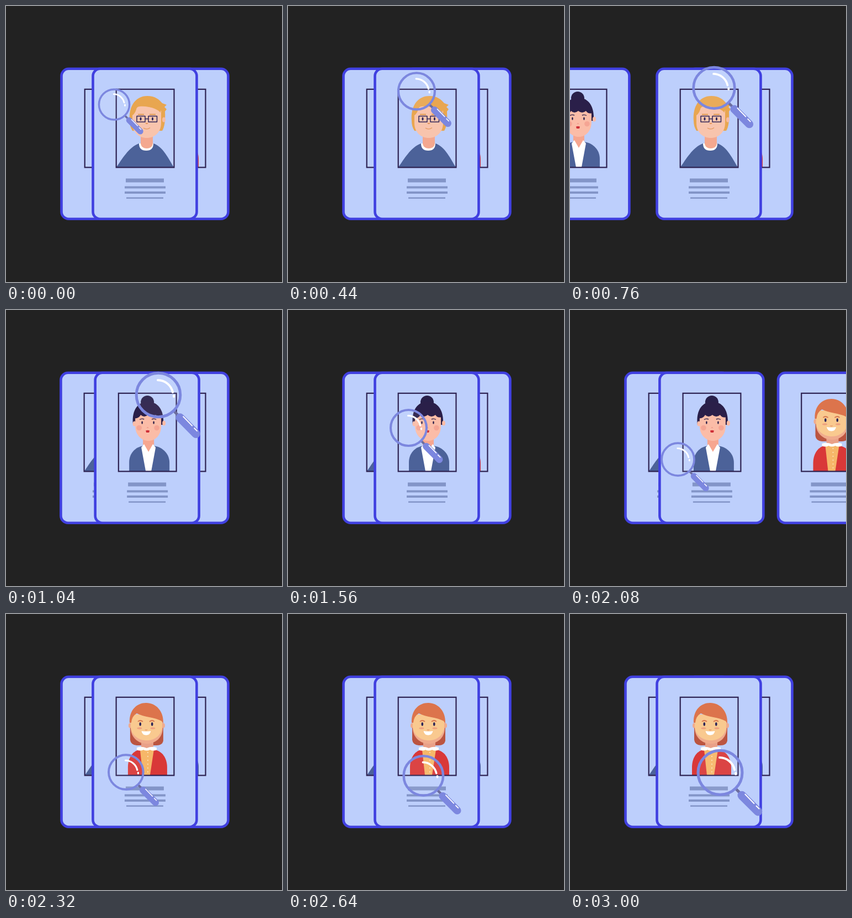
These frames come from a looping animation (500 px wide and 500 px high, 3.04 s). An HTML page:

```html
<!DOCTYPE html>
<html lang="en">
<head>
<meta charset="utf-8">
<title>Profile search</title>
<style>
html, body { margin: 0; width: 100%; height: 100%; overflow: hidden; background: #222; }
svg { display: block; width: 100%; height: 100%; }
</style>
</head>
<body>
<svg viewBox="0 0 500 500">
  <defs>
    <g id="sheet">
      <rect x="157.5" y="113.8" width="188" height="272" rx="13" fill="#bdcffc" stroke="#4040e0" stroke-width="4.6"/>
      <g fill="#8395c8">
        <rect x="217" y="312.5" width="69" height="7"/>
        <rect x="215" y="326.5" width="74" height="4"/>
        <rect x="215" y="336" width="74" height="4"/>
        <rect x="218" y="346.5" width="67" height="2.6"/>
      </g>
    </g>
    <rect id="frame" x="199.7" y="150.8" width="104.8" height="141.6" fill="none" stroke="#2c2150" stroke-width="2.2"/>
  </defs>

  <g id="cards">
    <g id="bun">
      <use href="#sheet"/>
      <path d="M219 292V276C219 260 230 248 245 246H264C281 249 292 261 292 277V292Z" fill="#4c6299"/>
      <path d="M244 228H264V244L254 260 244 244Z" fill="#f6a690"/>
      <path d="M241 249 246 243 254 257 262 243 267 249 259 292H249Z" fill="#fff"/>
      <circle cx="252" cy="167" r="12" fill="#28204a"/>
      <path d="M226 208C223 180 236 166 253 166S283 180 281 208H276V188H231V208Z" fill="#2a1f49"/>
      <g fill="#fbbca7">
        <ellipse cx="228.500" cy="206" rx="3" ry="4.500"/>
        <ellipse cx="282" cy="205" rx="3" ry="4.500"/>
        <path d="M230 186H277V210C277 227 266 237 254 237S230 227 230 210Z"/>
      </g>
      <path d="M229 196V184Q253 162 278 184V194Q271 196 267 190Q260 196 253 190Q246 196 240 190Q236 197 229 196Z" fill="#2a1f49"/>
      <g fill="#f5a594"><circle cx="237" cy="213.500" r="4.800"/><circle cx="269" cy="213.500" r="4.800"/></g>
      <g fill="#2a1f49"><ellipse cx="242.500" cy="204" rx="1.300" ry="2.800"/><ellipse cx="263.500" cy="204" rx="1.300" ry="2.800"/></g>
      <path d="M238 198.500Q242 196 246 198M260 198Q264 196 268 198.500" fill="none" stroke="#2a1f49" stroke-width="1.400"/>
      <path d="M251 213H254" stroke="#ee9585" stroke-width="1.300"/>
      <path d="M249 218.500Q252.500 217 256 218.500L255 222H250Z" fill="#cf3038"/>
      <use href="#frame"/>
    </g>

    <g id="red">
      <use href="#sheet"/>
      <path d="M225 202H285V230Q283 238 273 238H237Q226 237 225 228Z" fill="#bb5541"/>
      <path d="M221 292V278C221 261 229 249 241 246H269C283 248 292 261 292 278V292Z" fill="#d93838"/>
      <path d="M243 246H268L261 292H248Z" fill="#f6b769"/>
      <path d="M257 250V288" stroke="#fbe0b4" stroke-width="1.800" stroke-dasharray="2 5"/>
      <path d="M245 226H267V244Q256 248 245 244Z" fill="#e9a189"/>
      <path d="M237 242Q246 239 255 243Q264 239 273 242V246Q267 249 261 246Q255 249 249 246Q243 249 237 246Z" fill="#fff"/>
      <g fill="#f0ab8d">
        <ellipse cx="225" cy="202" rx="3" ry="4.500"/>
        <ellipse cx="285" cy="202" rx="3" ry="4.500"/>
        <path d="M226 190H284V206C284 225 270 235 255 235S226 224 226 206Z"/>
      </g>
      <path d="M226 182H283V203C283 219 270 229 255 229S226 219 226 203Z" fill="#f9c98f"/>
      <path d="M224 197C223 174 237 161 254 161S286 175 285 198L282 194C270 187 250 187 237 180Q228 185 227 197Z" fill="#dc744c"/>
      <path d="M239 195Q243 191 248 195M260 195Q265 191 269 195" fill="none" stroke="#d67650" stroke-width="1.700"/>
      <g fill="#2a2458"><ellipse cx="243.300" cy="199.500" rx="1.800" ry="3.200"/><ellipse cx="264.800" cy="199.500" rx="1.800" ry="3.200"/></g>
      <g fill="#efa17f"><ellipse cx="242" cy="207" rx="4.500" ry="1.700"/><ellipse cx="266" cy="207" rx="4.500" ry="1.700"/></g>
      <path d="M252 209.500Q254 211 256 209.500" fill="none" stroke="#e58e68" stroke-width="1.200"/>
      <path d="M245.500 212Q254 213.500 262.500 212Q261 219.500 254 219.500T245.500 212Z" fill="#fff"/>
      <use href="#frame"/>
    </g>

    <g id="man">
      <use href="#sheet"/>
      <path d="M200 292C210 278 222 256 241 249H267C285 255 295 278 304 292Z" fill="#4c6299"/>
      <path d="M241 249H267Q267 262 254 262T241 249Z" fill="#fff"/>
      <path d="M244 228H266V250Q264 258 255 258T244 250Z" fill="#f4a88f"/>
      <path d="M224 208C222 182 234 163 256 163C270 163 277 169 283 176L291 179 287 183 291 187 288 191C289 208 287 220 283 226H229Q224 218 224 208Z" fill="#e8a650"/>
      <ellipse cx="286" cy="206" rx="3" ry="4.500" fill="#f6bca4"/>
      <path d="M229 198Q235 194 237 183Q260 178 281 190V212C281 229 269 239 255 239S229 229 229 212Z" fill="#f8c4ad"/>
      <path d="M229 196V186Q252 170 280 184V193Q270 182 241 181Q235 185 229 196Z" fill="#e8a650"/>
      <path d="M239 196.500H250M260 196.500H271" stroke="#dd9850" stroke-width="2.200"/>
      <g fill="#2a2458"><ellipse cx="244" cy="204.500" rx="1.500" ry="3"/><ellipse cx="265.500" cy="204.500" rx="1.500" ry="3"/></g>
      <path d="M237 199.500H252V210H237ZM258 199.500H273.500V210H258ZM252 204.500H258" fill="none" stroke="#2c2458" stroke-width="1.500" stroke-linejoin="round"/>
      <path d="M253 212Q255 214 257 212" fill="none" stroke="#e0904f" stroke-width="1.700"/>
      <path d="M249 221Q255 225 261 220.500" fill="none" stroke="#e49a62" stroke-width="1.400"/>
      <use href="#frame"/>
    </g>
  </g>

  <g id="lens" fill="none" stroke-linecap="round">
    <path d="M27 28 38 39" stroke="#6c6d9e" stroke-width="5" stroke-linecap="butt"/>
    <path d="M39 41 68 70" stroke="#7c87df" stroke-width="15.500"/>
    <path d="M45 39 61 55.500M65 60 70 65" stroke="#fff" stroke-width="2"/>
    <circle r="39.700" fill="#fff" fill-opacity=".06" stroke="#7c87df" stroke-width="5"/>
    <path d="M-1-27A28 28 0 0 1 26-5M28 1V3" stroke="#fff" stroke-width="4"/>
  </g>
</svg>
<script>
const LOOP = 3040, STEP = 40;
const byId = id => document.getElementById(id);
const stack = byId('cards'), lens = byId('lens');

// [time, x offset]
const slides = {
  bun: [[510, -57], [800, -240], [1010, 4.5], [1120, 0], [2022, 0], [2232, 58], [2342, 57]],
  red: [[0, 57], [1732, 57], [2022, 240], [2232, -3], [2342, 0]],
  man: [[800, 0], [1010, -58.2], [1120, -57]]
};
const layers = [
  [0, ['bun', 'red', 'man']],
  [800, ['red', 'man', 'bun']],
  [2022, ['man', 'bun', 'red']]
];
// [time, x, y, ring radius]
const path = [
  [0, 196, 178.5, 27.6], [360, 226, 157, 32], [760, 261, 148.3, 37.3],
  [900, 271, 146, 39.2], [1040, 276, 154, 39.8], [1560, 218.5, 213.5, 32.5],
  [1880, 186, 253, 29], [2320, 217.3, 286.5, 31.3], [2660, 247, 293, 36],
  [3000, 272, 287.3, 40], [3040, 275, 286, 40.4]
];

const ease = p => p < .5 ? 4 * p ** 3 : 1 - 4 * (1 - p) ** 3;

function tween(keys, t) {
  if (t <= keys[0][0]) return keys[0][1];
  const i = keys.findIndex(k => k[0] > t);
  if (i < 0) return keys[keys.length - 1][1];
  const [t0, a] = keys[i - 1], [t1, b] = keys[i];
  return a + (b - a) * ease((t - t0) / (t1 - t0));
}

// Cubic Hermite curve through keys spaced unevenly in time
function spline(keys, t, axis) {
  const last = keys.length - 1;
  let i = 0;
  while (i < last - 1 && keys[i + 1][0] <= t) i++;
  const slope = n => {
    const a = keys[Math.max(n - 1, 0)], b = keys[Math.min(n + 1, last)];
    return (b[axis] - a[axis]) / (b[0] - a[0]);
  };
  const a = keys[i], b = keys[i + 1], span = b[0] - a[0];
  const p = (t - a[0]) / span, q = 1 - p;
  return a[axis] * q * q * (1 + 2 * p) + b[axis] * p * p * (1 + 2 * q)
    + span * p * q * (slope(i) * q - slope(i + 1) * p);
}

let order;
function render(t) {
  const next = layers.filter(l => l[0] <= t).pop()[1];
  if (next !== order) {
    order = next;
    order.forEach(id => stack.append(byId(id)));
  }
  for (const id in slides)
    byId(id).setAttribute('transform', `translate(${tween(slides[id], t)} 0)`);
  const [x, y, r] = [1, 2, 3].map(axis => spline(path, t, axis));
  lens.setAttribute('transform', `translate(${x} ${y}) scale(${r / 39.7})`);
}

const start = performance.now();
function tick(now) {
  const t = Math.max(0, now - start) % LOOP;
  render(Math.floor(t / STEP) * STEP);
  requestAnimationFrame(tick);
}
render(0);
requestAnimationFrame(tick);
</script>
</body>
</html>
```
